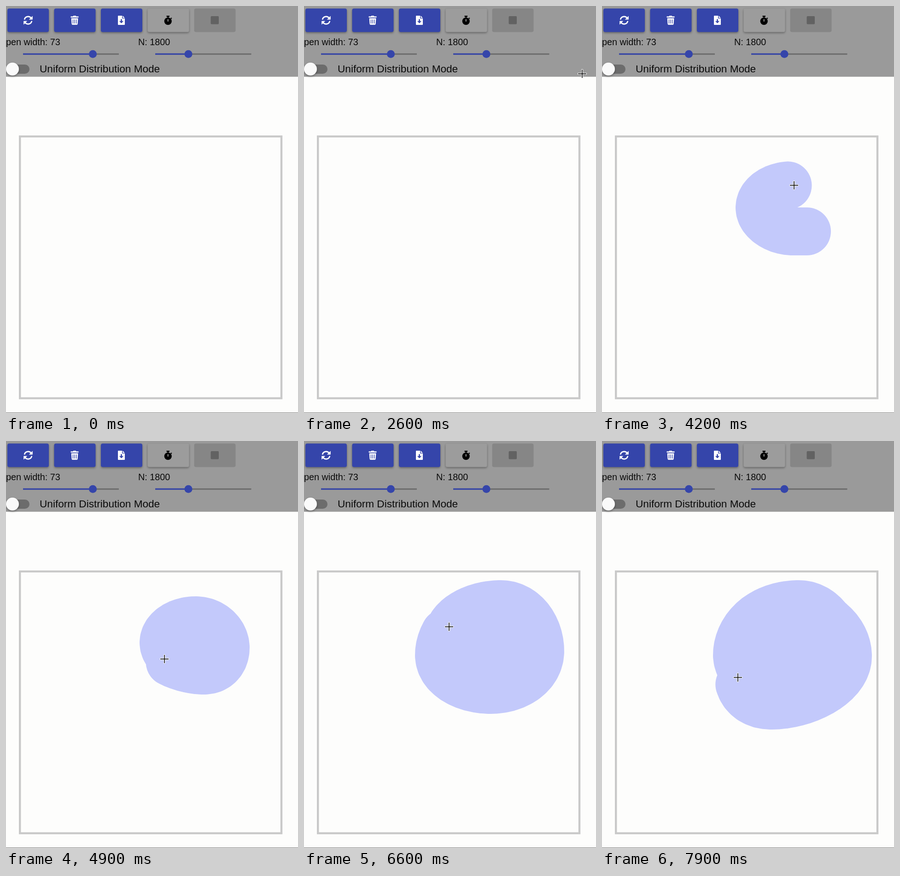
These frames come from a looping animation (634x883 px, 8000 ms). An HTML page:

```html
<!DOCTYPE html>
<html lang="en">
<head>
<meta charset="utf-8">
<title>Brush drawing</title>
<style>
  html, body { margin: 0; width: 100%; height: 100%; overflow: hidden; background: #fdfdfc; }
  svg { display: block; width: 634px; height: 883px; }
  text { font-family: "Liberation Sans", Arial, sans-serif; font-size: 19.8px; fill: #0a0a0a; }
  .raised { filter: drop-shadow(0 2px 2px rgba(0, 0, 0, .35)); }
  .blue { fill: #3545aa; }
  .line { stroke: #3545aa; fill: none; }
</style>
</head>
<body>
<svg viewBox="0 0 634 883">
  <defs>
    <rect id="button" y="5.5" width="90" height="51" rx="4"/>
    <g id="arrow">
      <path d="M40 29.5A8.2 8.2 0 0 1 54.5 26" fill="none" stroke="#fff" stroke-width="2.7"/>
      <path d="M57.8 21.5v7.3q0 .7-.7.7h-7.3z" fill="#fff"/>
    </g>
  </defs>

  <rect width="634" height="153.5" fill="#9a9a9a"/>
  <rect y="882" width="634" height="1" fill="#777"/>

  <g class="raised blue">
    <use href="#button" x="3"/>
    <use href="#button" x="104.5"/>
    <use href="#button" x="206"/>
    <use href="#button" x="307.5" fill="#9c9c9c"/>
  </g>
  <use href="#button" x="408.5" fill="#868686"/>
  <rect x="444.5" y="22" width="17.5" height="17.5" rx="2" fill="#626262"/>

  <!-- refresh -->
  <use href="#arrow"/>
  <use href="#arrow" transform="rotate(180 48 31)"/>

  <!-- trash -->
  <path d="M140.5 22.5h5l1-1.5h5l1 1.5h5v2.6h-17zM141.7 26.4h14.8l-.9 12.7q-.1 1.7-1.8 1.7h-9.4q-1.7 0-1.8-1.7z" fill="#fff"/>
  <path class="line" d="M145.5 29.3v8.8M149.1 29.3v8.8M152.7 29.3v8.8" stroke-width="1.3"/>

  <!-- file -->
  <path d="M244 21h8v6h6v12.8q0 1.2-1.2 1.2h-12.6q-1.2 0-1.2-1.2v-17.6q0-1.2 1-1.2zM253.3 21l4.7 4.7h-4.7z" fill="#fff"/>
  <path class="blue" d="M249.2 28.5h2.6v4.2h3.4l-4.7 4.9-4.7-4.9h3.4z"/>

  <!-- stopwatch -->
  <path d="M348.5 21h6.5v2.5h-2v2h-2.5v-2h-2zM357.2 26.7l1.7-1.7 1.6 1.6-1.8 1.8z"/>
  <circle cx="351.7" cy="33" r="8.1"/>
  <path d="M351.7 28.5v5.2" stroke="#9c9c9c" stroke-width="2"/>

  <text x="0" y="84.5">pen width: 73</text>
  <text x="287" y="84.5">N: 1800</text>
  <text x="73" y="144" style="font-size:22.6px">Uniform Distribution Mode</text>

  <g stroke-width="3">
    <path d="M37 104.3H245M324 104.3H532.5" stroke="#6c6c6c"/>
    <path class="line" d="M37 104.3H188M324 104.3H396"/>
  </g>
  <circle class="blue" cx="188.5" cy="104.3" r="8.5"/>
  <circle class="blue" cx="396" cy="104.3" r="8.5"/>
  <rect x="0" y="127" width="51" height="20" rx="10" fill="#6c6c6c"/>
  <circle class="raised" cx="14" cy="136.8" r="14" fill="#fafafa"/>

  <rect x="30.2" y="283" width="567.8" height="568" fill="none" stroke="#c9c9c9" stroke-width="4.4"/>

  <path id="blob" fill="none" stroke="#c3c9fb" stroke-width="104" stroke-linecap="round" stroke-linejoin="round"/>
  <g id="cursor" fill="none">
    <path d="M-10 0H10M0-10V10" stroke="#fff" stroke-width="3.6"/>
    <path d="M-9 0H9M0-9V9" stroke="#000" stroke-width="1.5"/>
  </g>
</svg>
<script>
const LOOP = 8000, STEP = 100, PEN_DOWN = 3500, LEAD = 35;

// Turning points of the hand, [time, position] per axis.
// Cosine swings between them make widening clockwise laps.
const turnsX = [
  [100, 23], [1000, 390], [1500, 159], [2700, 607], [PEN_DOWN, 445],
  [3950, 342], [4480, 477], [5120, 312], [5870, 513], [6480, 293], [7280, 534], [7950, 295]
];
const turnsY = [
  [100, 16], [1100, 369], [1500, 110], [2700, 147], [PEN_DOWN, 489], [3670, 489],
  [4220, 389], [4710, 498], [5530, 354], [6170, 540], [6860, 360], [7700, 574], [8320, 380]
];

const blob = document.getElementById("blob");
const cursor = document.getElementById("cursor");

function swing(turns, t) {
  const i = turns.findIndex(turn => turn[0] > t);
  if (i < 0) return turns[turns.length - 1][1];
  const [t0, a] = turns[i - 1], [t1, b] = turns[i];
  return a + (b - a) * (1 - Math.cos(Math.PI * (t - t0) / (t1 - t0))) / 2;
}

const hand = t => [swing(turnsX, t), swing(turnsY, t)];

function draw(t) {
  const points = [];
  for (let s = PEN_DOWN; s <= t; s += STEP / 4) points.push(hand(s));
  blob.setAttribute("d", points.length ? `M${points[0]}L${points.join(" ")}` : "");

  const visible = t >= STEP;
  cursor.style.display = visible ? "" : "none";
  if (visible) {
    const [x, y] = hand(t + LEAD).map(Math.round);
    cursor.setAttribute("transform", `translate(${x} ${y})`);
  }
}

const start = performance.now();
function tick() {
  const t = (performance.now() - start) % LOOP;
  draw(Math.floor(t / STEP) * STEP);
  requestAnimationFrame(tick);
}
tick();
</script>
</body>
</html>
```
